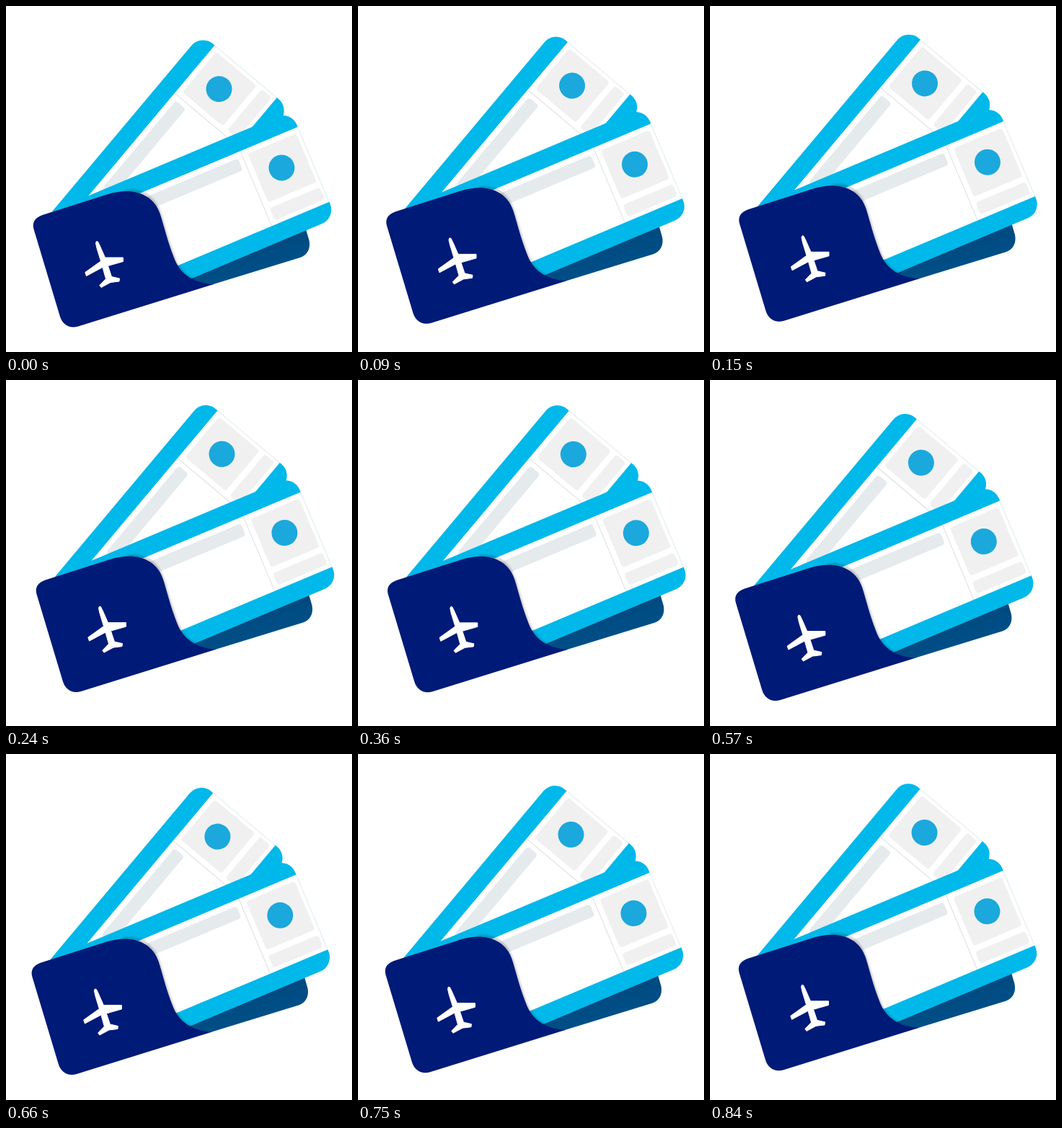
Animation, 480 px wide and 480 px high, one loop 0.87 s. Source, as an HTML page:

```html
<!DOCTYPE html>
<html lang="en">
<head>
<meta charset="utf-8">
<title>Tickets</title>
<style>
  html, body { margin: 0; height: 100%; overflow: hidden; background: #fff; }
  svg { display: block; width: 100vw; height: 100vh; }
</style>
</head>
<body>
<svg viewBox="0 0 480 480">
  <defs>
    <!-- The origin is the top right corner of the white area -->
    <g id="ticket">
      <rect x="-340" y="-24.600" width="340.500" height="161.400" rx="21" fill="#00b8e9"/>
      <rect x="-340" width="340.500" height="112.700" fill="#fff"/>
      <path d="M0 0V112" stroke="#f1f1f1"/>
      <path d="M-86 0V112" stroke="#dcdfe1"/>
      <rect x="-250" y="8" width="157" height="18" rx="4" fill="#e5eaed"/>
      <g fill="#f0f0f0">
        <rect x="-78" y="7.500" width="73" height="73" rx="4"/>
        <rect x="-79" y="89" width="75" height="18" rx="4"/>
      </g>
      <circle cx="-42" cy="43.500" r="18" fill="#1ba8dc"/>
    </g>
    <linearGradient id="pocketShade" gradientUnits="userSpaceOnUse" x1="330" y1="345" x2="338" y2="371">
      <stop stop-color="#004a80"/>
      <stop offset="1" stop-color="#004f88"/>
    </linearGradient>
    <filter id="soft"><feGaussianBlur stdDeviation="1.5"/></filter>
  </defs>
  <g id="wallet">
    <path fill="url(#pocketShade)" d="M230 345L412 296L420.500 325C423 336 418 346 408 349L286 386.500L240 384Z"/>
    <use href="#ticket" transform="translate(289.200 55) rotate(-50)"/>
    <use href="#ticket" transform="translate(404.300 168) rotate(-22.800)"/>
    <path fill="none" stroke="#000" stroke-opacity=".25" stroke-width="3" filter="url(#soft)"
      d="M165 257C190 253 207 267 214 289C220 308 224 326 233 349C239 365 249 375 261 380"/>
    <path fill="#001a78" d="M50.500 290L140 261.500C172 251 204 258 214 289C220 308 224 326 233 349C242 374 263 385 288 386L100 444.500C88 448 78.500 442 75 431L38.600 310C35.600 300 40.500 293.500 50.500 290Z"/>
    <path fill="#fff" stroke="#fff" stroke-linejoin="round" d="M125.500 326.500L127.500 327L130 332L137.500 349L162.500 349V354.500L141.500 360.500L146.500 375.500L157.500 378L157 382L145 383.500L132 390.500L129.800 387.500L138.500 378.500L134 362.500L111.500 374.500L109.800 369.500L131.500 354L126 336L124.500 329Z"/>
  </g>
</svg>
<script>
  const LOOP = 870, STEP = 30, LEG = 300;
  // Positions at the end of each straight leg; the loop cuts hard to the start
  const stops = [[0, 0], [5, -15.5], [-3.5, 1.3], [3.4, -8]];
  const wallet = document.getElementById('wallet');

  function draw(now) {
    const t = Math.floor(now % LOOP / STEP) * STEP;
    const leg = Math.floor(t / LEG);
    const p = t % LEG / LEG;
    const [x, y] = stops[leg].map((from, i) => from + (stops[leg + 1][i] - from) * p);
    wallet.setAttribute('transform', `translate(${x} ${y})`);
    requestAnimationFrame(draw);
  }
  draw(performance.now());
</script>
</body>
</html>
```
